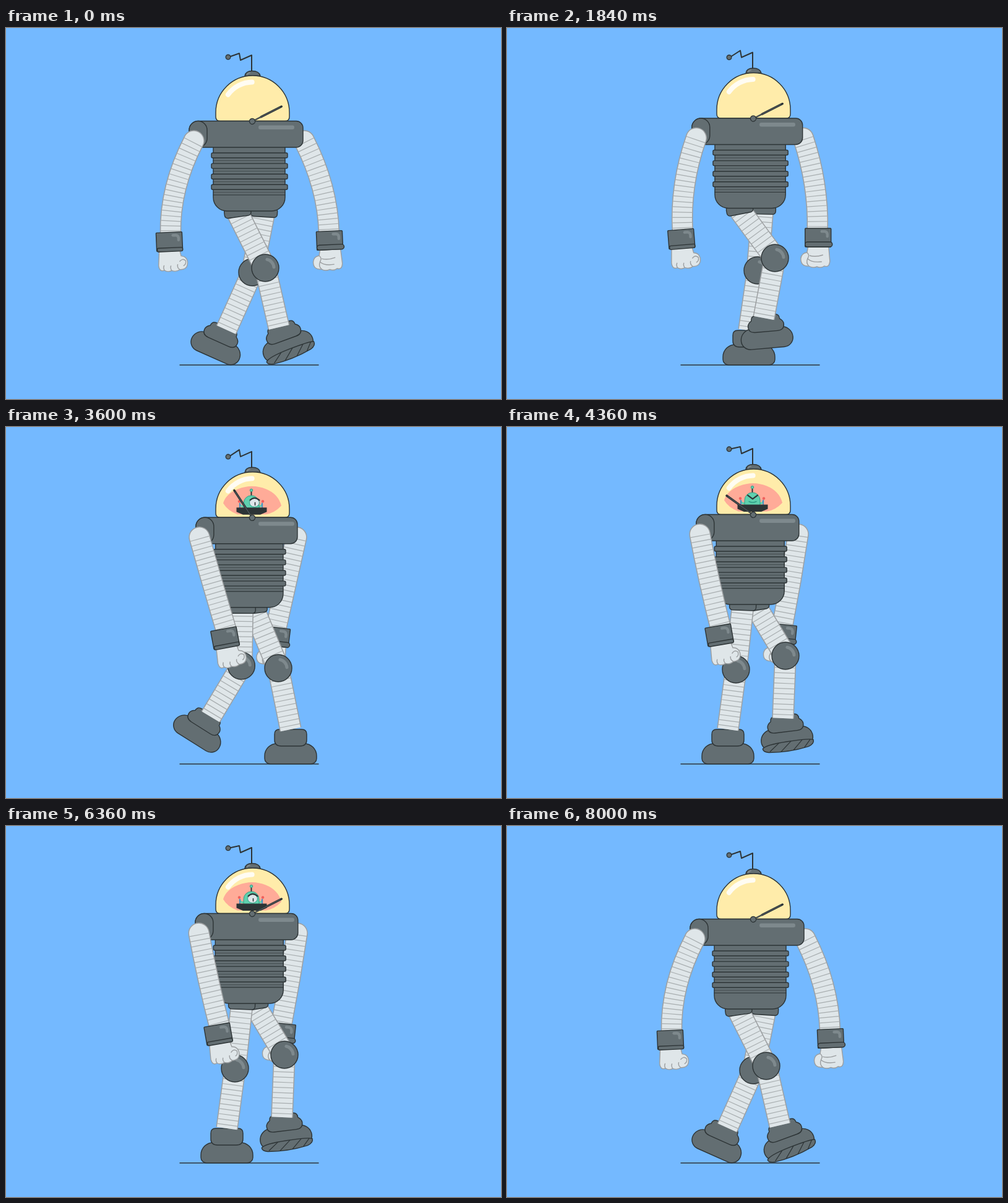
These frames come from a looping animation (800x600 px, 8040 ms). An HTML page with a canvas:

```html
<!DOCTYPE html>
<html lang="en">
<head>
<meta charset="utf-8">
<title>Walking robot</title>
<style>
  html, body { margin: 0; width: 100%; height: 100%; overflow: hidden; background: #74b9ff; }
  canvas { display: block; width: 800px; height: 600px; }
</style>
</head>
<body>
<canvas id="stage" width="800" height="600"></canvas>
<script>
const g = document.getElementById('stage').getContext('2d');
const LOOP = 8040, STEP = 40, CYCLE = 1000, TAU = Math.PI * 2, DEG = Math.PI / 180;
const SKY = '#74b9ff', METAL = '#636e72', DARK = '#2d3436', SHINE = '#7e898d',
      LIGHT = '#dfe6e9', EDGE = '#9b9ea0', RIB = '#a8aeb0', GLASS = '#ffecaa', PINK = '#ffab98',
      TEAL = '#5fd0ae', DEEP = '#2f9f86', RED = '#f0605c';

// phase, knee x, knee y, ankle x, ankle y, foot angle
const NEAR = [
  [0, 419, 388, 443, 480, -20], [.1, 411, 394, 430, 490, 0], [.22, 392, 393, 397, 490, 0],
  [.36, 370, 392, 357, 490, 0], [.5, 363, 390, 322, 482, 24], [.62, 385, 385, 333, 462, 32],
  [.73, 416, 376, 374, 458, 16], [.84, 433, 372, 417, 465, -5], [.93, 435, 376, 439, 470, -17]
];
const FAR = [
  [0, 446, 384, 473, 478, -20], [.1, 440, 390, 460, 490, 0], [.22, 424, 393, 425, 490, 0],
  [.34, 405, 392, 391, 490, 0], [.5, 398, 395, 354, 484, 24], [.62, 412, 388, 362, 464, 32],
  [.74, 440, 376, 404, 458, 14], [.86, 450, 370, 448, 467, -7], [.93, 452, 375, 466, 470, -17]
];

const clamp = (v, a = 0, b = 1) => Math.min(b, Math.max(a, v));
const wave = (p, shift = 0, n = 1) => Math.cos(TAU * n * (p - shift));

// Smooth periodic interpolation through the rows of a table.
function sample(rows, u) {
  const n = rows.length;
  let i = n - 1;
  while (i > 0 && rows[i][0] > u) i--;
  const at = k => {
    const turn = Math.floor(k / n), r = rows[k - turn * n];
    return [r[0] + turn, ...r.slice(1)];
  };
  const [a, b, c, d] = [at(i - 1), at(i), at(i + 1), at(i + 2)];
  const h = c[0] - b[0], s = (u - b[0]) / h, s2 = s * s, s3 = s2 * s;
  return b.slice(1).map((v, j) => {
    const k = j + 1;
    const m0 = (c[k] - a[k]) / (c[0] - a[0]) * h, m1 = (d[k] - b[k]) / (d[0] - b[0]) * h;
    return (2 * s3 - 3 * s2 + 1) * v + (s3 - 2 * s2 + s) * m0 + (3 * s2 - 2 * s3) * c[k] + (s3 - s2) * m1;
  });
}

function paint(path, fill, stroke, width = 1.4) {
  if (fill) { g.fillStyle = fill; g.fill(path); }
  if (stroke) { g.strokeStyle = stroke; g.lineWidth = width; g.stroke(path); }
}
function box(x, y, w, h, r, fill = METAL, stroke = DARK) {
  const p = new Path2D();
  p.roundRect(x, y, w, h, r);
  paint(p, fill, stroke);
}
function disc(x, y, r, fill = METAL, stroke = DARK, width) {
  const p = new Path2D();
  p.arc(x, y, r, 0, TAU);
  paint(p, fill, stroke, width);
}
function shape(d, fill, stroke, width) { paint(new Path2D(d), fill, stroke, width); }
function arc(x, y, r, from, to, color, width) {
  const p = new Path2D();
  p.arc(x, y, r, from * DEG, to * DEG);
  paint(p, null, color, width);
}
function placed(x, y, deg, draw) {
  g.save();
  g.translate(x, y);
  g.rotate(deg * DEG);
  draw();
  g.restore();
}

// Ribbed hose along a quadratic curve.
function hose(a, c, b, width, cap) {
  const d = `M${a}Q${c} ${b}`;
  g.lineCap = cap;
  shape(d, null, EDGE, width + 1.5);
  shape(d, null, LIGHT, width - 1.5);
  g.lineCap = 'butt';
  const count = Math.round(Math.hypot(b[0] - a[0], b[1] - a[1]) / 8.4);
  const ribs = new Path2D();
  for (let i = 0; i < count; i++) {
    const s = (i + .3) / count, q = 1 - s;
    const pos = k => q * q * a[k] + 2 * q * s * c[k] + s * s * b[k];
    const tan = k => q * (c[k] - a[k]) + s * (b[k] - c[k]);
    const [x, y, tx, ty] = [pos(0), pos(1), tan(0), tan(1)];
    const f = (width / 2 - .5) / Math.hypot(tx, ty);
    ribs.moveTo(x - ty * f, y + tx * f);
    ribs.lineTo(x + ty * f, y - tx * f);
  }
  paint(ribs, null, RIB, 1.2);
}
const mid = (a, b) => [(a[0] + b[0]) / 2, (a[1] + b[1]) / 2];

// A lifted foot is rounder and its collar flares out.
function foot(x, y, angle, lift) {
  placed(x, y, angle, () => {
    const heel = 9 + 8 * lift, top = 26 - 3 * lift, low = 26 + 3 * lift;
    box(-42, 22 - 2 * lift, 84, 33, [20, 20, heel, heel]);
    const sole = clamp((-angle - 5) / 2);
    if (sole > 0) {
      g.globalAlpha = sole;
      shape('M-41 49Q-36 43 0 42Q36 41 42 44Q43 51 33 54Q0 60 -32 56Q-41 54 -41 49Z', METAL, DARK);
      shape('M-14 43L-30 55M6 42L-12 57M24 42L8 57M37 43L26 55', null, DARK, 1.2);
      g.globalAlpha = 1;
    }
    shape(`M${8 - top} -1H${top - 8}Q${top} -1 ${top} 7Q${low} 11 ${low} 16Q${low} 26 ${low - 11} 26` +
          `H${11 - low}Q${-low} 26 ${-low} 16Q${-low} 11 ${-top} 7Q${-top} -1 ${8 - top} -1Z`, METAL, DARK);
  });
}

function leg(rows, u, hip) {
  const [kx, ky, ax, ay, angle] = sample(rows, u);
  const lift = clamp(Math.abs(angle) / 5);
  const knee = [kx, ky], ankle = [ax + 2 * lift * Math.sign(angle), ay - 1 + 5 * lift];
  hose(hip, mid(hip, knee), knee, 35, 'butt');
  foot(ax, ay, angle, lift);
  hose(knee, mid(knee, ankle), ankle, 34, 'butt');
  disc(kx, ky, 22);
  g.lineCap = 'round';
  arc(kx, ky, 14, -78, -5, SHINE, 5);
  const tilt = -.3 * Math.atan2(kx - hip[0], ky - hip[1]) / DEG;
  placed(hip[0], hip[1], tilt, () => box(-21.5, -9, 43, 15, 5));
}

function fist(side) {
  g.save();
  g.scale(side, 1);
  shape('M-17 14L-19 38Q-18 49 -10 46Q-5 50 2 47Q9 50 15 46Q28 47 28 34Q27 25 18 24L16 14Z', LIGHT, EDGE);
  if (side > 0) {
    shape('M-10 46Q-12 42 -10 38M2 47Q-1 43 1 39M15 46Q10 42 12 37M15 33Q20 27 25 32Q26 38 21 40', null, EDGE);
  } else {
    shape('M18 24Q13 28 17 34Q20 41 15 46M17 34Q10 41 -6 39M14 29Q4 32 -8 28', null, EDGE);
  }
  g.restore();
}

function arm(start, bend, cuff, angle, side) {
  const end = [cuff[0] + (side > 0 ? 2 : -1), cuff[1] - 12];
  const [mx, my] = mid(start, end);
  hose(start, [mx + bend, my], end, 33, 'round');
  placed(...cuff, angle, () => {
    fist(side);
    box(-21, -15, 42, 30, 1);
    g.lineCap = 'round';
    g.lineJoin = 'round';
    shape('M6 -10H11Q16 -9 15 -2', null, SHINE, 4.5);
    if (side > 0) box(-20, 10, 41, 6, 2);
    else box(-21, 7, 44, 8, 4);
  });
}

// Wiper angle above the right horizon, and the angle wiped clear so far.
const WIPE = { start: 2232, sweep: 412, sweeps: 8, low: 27, high: 152.5 };
function wiper(t) {
  const s = clamp((t - WIPE.start) / WIPE.sweep, 0, WIPE.sweeps);
  const angle = (WIPE.high + WIPE.low) / 2 - (WIPE.high - WIPE.low) / 2 * Math.cos(Math.PI * s);
  return { angle, cleared: s >= 1 ? 180 : s > 0 ? angle : 0 };
}

function pilot(t) {
  shape('M351 -23Q355 -38 375 -46Q398 -55 420 -46Q440 -38 445 -19Q434 -7 420 -5H374Q358 -11 351 -23Z', PINK);
  g.lineCap = 'round';
  shape('M396.5 -36V-42', null, DARK, 2);
  disc(396.5, -44, 2.2, TEAL, DEEP, 1);
  shape('M386 -19Q381 -16 378 -21M407 -19Q411 -16 414 -21', null, TEAL, 3);
  shape('M378 -16V-23M414 -16V-23', null, '#4a8fc4', 2);
  disc(377, -26, 2.2, RED, null);
  disc(415, -26, 2.2, RED, null);
  shape('M384 -15V-23A12.5 12.5 0 0 1 409 -23V-15Z', TEAL, DEEP, 1);
  if (t > 4000 && t < 4600) {
    shape('M389 -31L397 -25L405 -31', null, DARK, 2.2);
    shape('M391 -21Q397 -18 403 -21', null, DEEP, 1.5);
  } else {
    const look = t < 4000 ? 5 : t < 5800 ? 1 : 2;
    const x = 396.5 + look;
    const p = new Path2D();
    p.ellipse(x, -24, 8, 7, 0, 0, TAU);
    paint(p, '#dfe6e9', DEEP, 1);
    shape(`M${x - 7} -28Q${x} -35 ${x + 8} -28`, null, DARK, 2.2);
    shape(`M${x + 1} -24V-20`, null, DARK, 1.6);
  }
  shape('M372.5 -16H421.5V-9L411 -4.5H383L372.5 -9Z', DARK);
}

function head(t, p) {
  const drag = 1.2 - 1.2 * wave(p) - 5.3 * Math.sin(TAU * p);
  g.lineJoin = 'round';
  g.lineCap = 'round';
  shape(`M397 -79V-106.5L379 -98.5L377 -109.5L360 ${-103.5 + drag}`, null, DARK, 2);
  disc(359, -103.5 + drag, 3.8);
  shape('M386 -73Q387 -81 398 -81Q409 -81 411 -73Z', METAL, DARK);
  shape('M390 -75Q391 -78 394 -78', null, SHINE, 2);
  const dome = new Path2D('M339 -14A59.5 59.5 0 0 1 458 -14V-7Q458 0 451 0H346Q339 0 339 -7Z');
  paint(dome, GLASS);
  const { angle, cleared } = wiper(t);
  const clear = 1 - clamp((t - 6800) / 600);
  if (cleared && clear > 0) {
    g.save();
    g.globalAlpha = clear;
    g.beginPath();
    g.moveTo(398, 0);
    g.arc(398, 0, 90, 0, -cleared * DEG, true);
    g.clip();
    pilot(t);
    g.restore();
  }
  g.lineCap = 'round';
  arc(398.5, -14, 49, 216, 269, 'rgba(255,255,255,.85)', 8);
  paint(dome, null, DARK);
  return angle;
}

function torso(c) {
  const x = 337 - 2 * c, w = 449.3 + 1.7 * c - x;
  box(x, 38, w, 107.5, [0, 0, 22, 22]);
  shape(`M${x} 119.5h${w}`, null, DARK, 1.2);
  for (let i = 0; i < 4; i++) {
    const y = 51.5 + 17.1 * i;
    shape(`M${x} ${y + 12.5}h${w}`, null, DARK, .6);
    box(x - 3, y, w + 7, 8, 2);
  }
  const left = 302 - 6 * c, right = 475 + 5 * c;
  box(left, 0, right - left, 42.5, [15, 11, 11, 15]);
  box(left, 0, 29, 42.5, 15);
  box(408, 7, 58, 6.5, 3.2, SHINE, null);
}

function draw(t) {
  const p = t % CYCLE / CYCLE, c = wave(p);
  const base = 146.6 + 3.7 * c + 2.8 * wave(p, .12, 2);
  g.fillStyle = SKY;
  g.fillRect(0, 0, 800, 600);
  g.lineCap = 'butt';
  shape('M280.5 545H505.5', null, DARK);

  arm([475 + 7 * c, base + 32], 8 + 10 * c,
      [477.8 + 48.1 * c - 2.9 * c * c, base + 193], 2.7 - 5.2 * c, -1);
  leg(FAR, (p + .5) % 1, [408 + 9 * c, base + 149]);
  leg(NEAR, p, [378.5 - 4 * c, base + 149]);

  g.save();
  g.translate(0, base);
  const angle = head(t, p);
  torso(c);
  placed(398, .5, -angle, () => {
    g.lineCap = 'round';
    shape('M0 0H53', null, DARK, 2.4);
    shape('M16 0H53', null, DARK, 3.4);
    shape('M5 0H50', null, METAL, .8);
    disc(0, 0, 4.5);
  });
  g.restore();

  arm([308.5 - 5 * c, base + 32], -9.5 - 11 * c,
      [306.9 - 51.4 * c + 8.5 * c * c, base + 195], -7 + 4.5 * c, 1);
}

const began = performance.now();
function tick() {
  const t = (performance.now() - began) % LOOP;
  draw(Math.floor(t / STEP) * STEP);
  requestAnimationFrame(tick);
}
tick();
</script>
</body>
</html>
```
